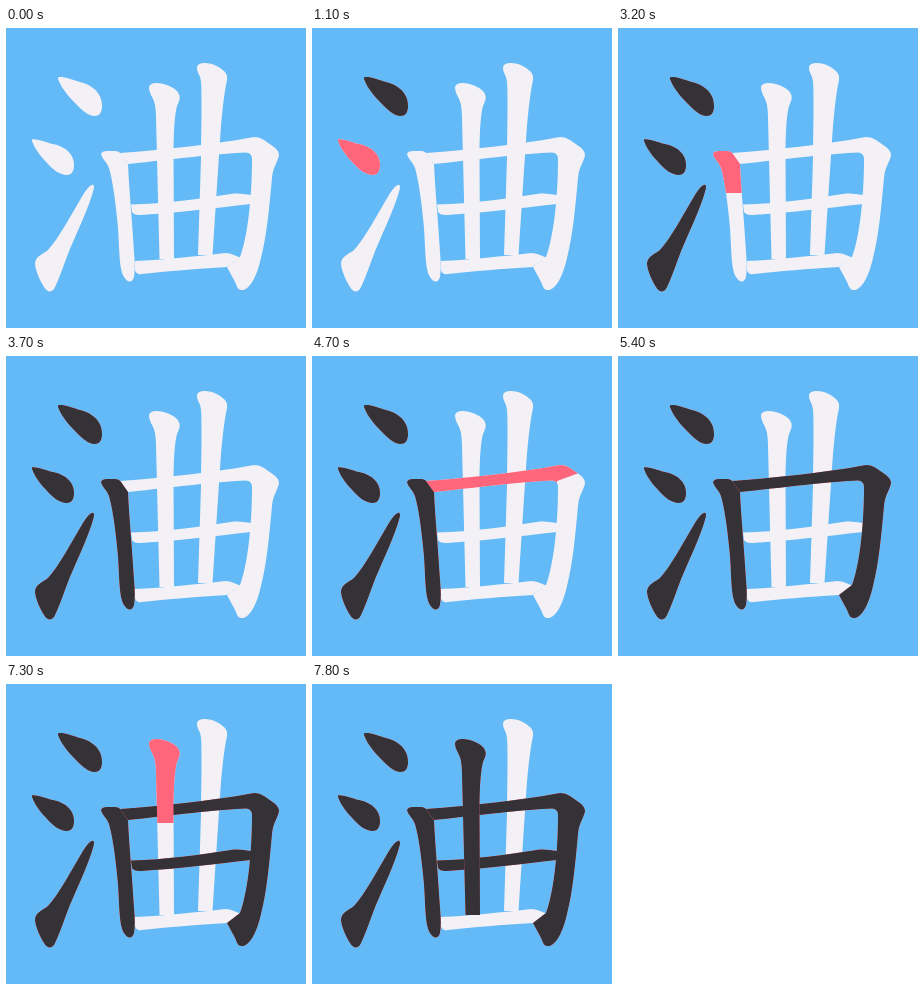
These frames come from a looping animation (300x300 px, 8000 ms). An HTML page with a canvas:

```html
<!DOCTYPE html>
<html lang="zh">
<head>
<meta charset="utf-8">
<title>Stroke order</title>
<style>
html, body { margin: 0; width: 100%; height: 100%; overflow: hidden; background: #64b9f7; }
canvas { display: block; width: 300px; height: 300px; }
</style>
</head>
<body>
<canvas id="stage" width="300" height="300"></canvas>
<script>
const LOOP = 8000, TICK = 100, PAUSE = 700, ADVANCE = 42;
const BLANK = '#f3f1f5', ACTIVE = '#ff667b', DONE = '#343236', SKY = '#64b9f7';

// Each sweep returns the area revealed after a number of steps.
const right = x => step => `M0 0H${x + ADVANCE * step}V300H0Z`;
const down = y => step => `M0 0H300V${y + ADVANCE * step}H0Z`;
const up = y => step => `M0 ${y - ADVANCE * step}H300V300H0Z`;

// Along the bar to a slanted joint, over the corner, then down.
const around = step => {
  if (step < 4) return right(114)(step);
  const bar = 'M0 0H300V105L245 125V145H0Z';
  return step === 4 ? bar : bar + down(128)(step - 5);
};

const strokes = [
  { steps: 2, sweep: right(52), d: `M52 49.5C55 48 63 50.5 72 53.5C88 57 96 66 96 78
    C96 85 93 88 88.500 88C82 87.500 78 83.500 73.500 79.500C65 71 56 62 52 51Z` },
  { steps: 2, sweep: right(26), d: `M26 111.500C29 110 39 114 47 116C61 119 68 127 68 137
    C68 144 65 147 60.500 147C54 146.500 49 143 45 139C37 131 29 122 26 113Z` },
  { steps: 3, sweep: up(265), d: `M86 157C88 156 88.500 159 87.500 162C83 179 72 202 63.500 222
    C57 239 52 254 48 261C45 265 41 264 38 259C33 251 29 241 29 235
    C30 228 37 226 42 222C53 210 65 187 77.500 166Q83 157.500 86 157Z` },
  { steps: 4, sweep: down(123), d: `M95 126Q96 123 101 123H109Q113 123 115 126L122 136
    C123 160 126 190 128 224Q129.500 241 128 249C126 255 122 255 118 249
    C112 239 114 216 111 190C109 169 106 150 103 140C101 134 96 131 95 126Z` },
  { steps: 9, sweep: around, d: `M114 125C158 121.500 205 117 245 109.500Q252 108 258 112L268 119
    Q273 123 273 127C272 134 267 138 266 150C263 182 261 206 255 230
    C251 248 244 261 237 262C231 263 231 257 228 252L221 239L234 229
    C241 211 246 172 246 131Q246 125 240 124.500C217 125 160 132 122 136Z` },
  { steps: 3, sweep: right(125), d: `M125 176.500C160 175.500 192 171 228 165.500Q235 165 245 167V176
    C208 180 170 185 135 187Q128 187.500 126 184Z` },
  { steps: 5, sweep: down(55), d: `M143 60C143 56 147 55 151 55C158 55 167 59 171 63
    C176 69 173 73 171 78C168.500 88 168 100 167.500 120L168 231H153.500L151 130L150 90
    C150 77 148 72 145 67Q143 63 143 60Z` },
  { steps: 5, sweep: down(35), d: `M191 40C191 36 195 35 199 35C207 35 214 39 219 44
    Q221.500 47 221 52C218 66 216 85 214.500 105L211.500 150L206.500 227H192L195 130
    C195.500 96 196 65 195 54C194.500 47 191 45 191 40Z` },
  { steps: 3, sweep: right(128), d: `M129 233C157 232 192 228 219 225Q224 225 228 227L234 229.500
    L221 239C190 241 161 243 136 246Q130 247 129 242Z` }
];

let start = TICK;
for (const stroke of strokes) {
  stroke.shape = new Path2D(stroke.d);
  stroke.start = start;
  stroke.end = start + (stroke.steps + 1) * TICK;
  start = stroke.end + PAUSE;
}

const ctx = document.getElementById('stage').getContext('2d');

function paint(shape, color) {
  ctx.fillStyle = color;
  ctx.fill(shape);
}

function draw(time) {
  ctx.fillStyle = SKY;
  ctx.fillRect(0, 0, 300, 300);
  strokes.forEach(stroke => paint(stroke.shape, BLANK));

  for (const { shape, start, end, steps, sweep } of strokes) {
    if (time < start) break;
    const step = Math.min(steps, Math.floor((time - start) / TICK) + 1);
    ctx.save();
    ctx.clip(new Path2D(sweep(step)));
    paint(shape, ACTIVE);
    ctx.restore();
    if (time >= end) paint(shape, DONE);
  }
}

const origin = performance.now();
function frame() {
  draw((performance.now() - origin) % LOOP);
  requestAnimationFrame(frame);
}
frame();
</script>
</body>
</html>
```
